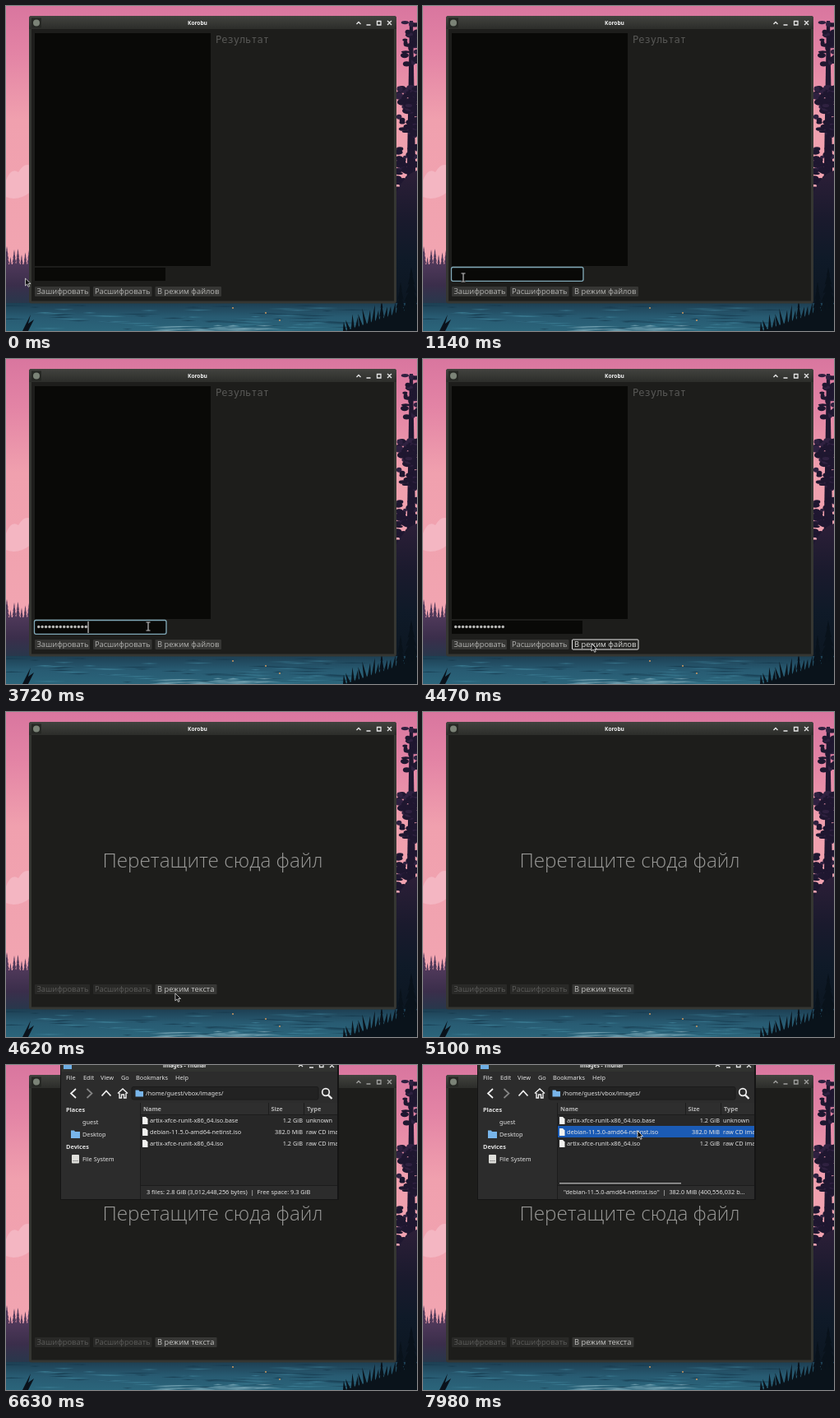
Recreate the animation shown at these times as an HTML page. Size 500 by 395 pixels, loop 8 s.

```html
<!DOCTYPE html>
<html lang="ru">
<head>
<meta charset="utf-8">
<title>Korobu</title>
<style>
html, body { margin: 0; width: 100%; height: 100%; overflow: hidden; background: #1d1d1b }
svg { display: block; width: 500px; height: 395px }
text { white-space: pre }
.ui { font: 9.3px "Open Sans", "Noto Sans", sans-serif; fill: #b4b4b2 }
.fm { font: 7.35px "Noto Sans", sans-serif; fill: #e2e2e2 }
.bold { font-weight: 700 }
.title { font: 700 6.6px "Noto Sans", sans-serif; fill: #f0f0f0; text-anchor: middle }
.line { fill: none; stroke: #e6e6e6; stroke-width: 1.3 }
</style>
</head>
<body>
<svg viewBox="0 0 500 395">
  <defs>
    <linearGradient id="sky" x2="0" y2="1">
      <stop offset="0" stop-color="#d9769f"/>
      <stop offset=".15" stop-color="#e384a5"/>
      <stop offset=".35" stop-color="#f0a0ae"/>
      <stop offset="1" stop-color="#f2a7b2"/>
    </linearGradient>
    <linearGradient id="wood" x2="0" y2="1">
      <stop offset="0" stop-color="#4e3859"/>
      <stop offset=".5" stop-color="#3b2e4b"/>
      <stop offset="1" stop-color="#26394c"/>
    </linearGradient>
    <linearGradient id="hill" x2="0" y2="1">
      <stop offset="0" stop-color="#2c1f38"/>
      <stop offset=".3" stop-color="#1a1a2d"/>
      <stop offset=".55" stop-color="#0f1a28"/>
      <stop offset="1" stop-color="#0a141d"/>
    </linearGradient>
    <linearGradient id="lake" x2="0" y2="1">
      <stop offset="0" stop-color="#1d3f53"/>
      <stop offset=".5" stop-color="#285b72"/>
      <stop offset="1" stop-color="#2b657b"/>
    </linearGradient>
    <linearGradient id="bar" x2="0" y2="1">
      <stop offset="0" stop-color="#42433f"/>
      <stop offset="1" stop-color="#2c2d2a"/>
    </linearGradient>
    <clipPath id="fmClip"><path d="M67 0H403V163H67z"/></clipPath>
  </defs>

  <rect width="500" height="395" fill="url(#sky)"/>
  <path d="M0 212Q6 196 15 202Q22 190 30 194V226Q14 238 0 232z" fill="#f4b6c2"/>
  <g id="scene"></g>

  <rect x="28" y="12" width="447" height="349.5" rx="3" fill="#353632"/>
  <path d="M28 28V15a3 3 0 0 1 3-3H472a3 3 0 0 1 3 3V28z" fill="url(#bar)"/>
  <rect x="31" y="28" width="441" height="330.5" fill="#1d1d1b"/>
  <rect x="31" y="14.500" width="12" height="12" fill="#262824"/>
  <circle cx="37" cy="20.500" r="4" fill="#7b8377"/>
  <g id="frameTitle">
    <text class="title" x="233" y="23">Korobu</text>
    <path class="line" d="M426.500 22l2.500-2.500 2.500 2.500M438.500 23h5M451.500 18.500h4.500v4.500h-4.500zM464 18l5 5M469 18l-5 5"/>
  </g>

  <g id="textMode" class="ui">
    <rect x="35" y="33" width="214" height="283" fill="#090907"/>
    <text x="255" y="45" style="font:12px 'DejaVu Sans Mono',monospace" fill="#585856">Результат</text>
    <rect x="35" y="318" width="159" height="16" fill="#090907"/>
    <rect id="fieldRing" x="34.500" y="317.500" width="160.500" height="16.800" rx="2" fill="none" stroke="#80a9b8" stroke-width="1.300"/>
    <g id="dots" fill="#b8b8b6"></g>
    <rect id="caret" y="319" width="1" height="14" fill="#f2f2f2"/>
    <g fill="#363634">
      <rect x="35" y="341" width="67" height="12" rx="1"/>
      <rect x="106" y="341" width="71.500" height="12" rx="1"/>
      <rect id="modeBox" x="181.500" y="341" width="80.500" height="12" rx="1"/>
    </g>
    <text x="37.400" y="350.200">Зашифровать</text>
    <text x="107.900" y="350.200">Расшифровать</text>
    <text id="modeText" x="184" y="350.200">В режим файлов</text>
  </g>

  <g id="fileMode" class="ui">
    <text x="251.500" y="189" text-anchor="middle" style="font-size:24.3px;font-weight:300" fill="#999997">Перетащите сюда файл</text>
    <g fill="#292927">
      <rect x="35" y="331" width="67" height="12" rx="1"/>
      <rect x="106" y="331" width="71.500" height="12" rx="1"/>
      <rect x="181.500" y="331" width="75" height="12" rx="1" fill="#373735"/>
    </g>
    <text x="37.400" y="340.200" fill="#5c5c5a">Зашифровать</text>
    <text x="107.900" y="340.200" fill="#5c5c5a">Расшифровать</text>
    <text x="184" y="340.200" fill="#c4c4c2">В режим текста</text>
  </g>

  <g id="files" class="fm">
    <rect x="66" width="339" height="164" fill="#151515"/>
    <g clip-path="url(#fmClip)">
      <rect x="67" width="337" height="163" fill="#2c2c2c"/>
      <rect x="67" width="337" height="8" fill="#313230"/>
      <text class="title" x="217.500" y="3">images - Thunar</text>
      <path class="line" d="M356 2l2.500-2.500 2.500 2.500M369 3h5M381.500-2h4.500v4.500h-4.500zM394-2l5 5M399-2l-5 5"/>
      <rect x="70" y="-4" width="10" height="9" fill="#6faee4"/>
      <g id="menu"></g>
      <g fill="none" stroke="#f0f0f0" stroke-width="1.700">
        <path d="M85 29l-6 5.500 6 5.500"/>
        <path d="M98.500 29l6 5.500-6 5.500" stroke="#858585"/>
        <path d="M116.500 37.500l5.500-6 5.500 6"/>
        <path d="M136 34.500l6-5.500 6 5.500M138 34v6h2.500v-4h3v4h2.500v-6" stroke-width="1.400"/>
        <circle cx="389" cy="33" r="4.300"/>
        <path d="M392 36.500l4.500 4.500" stroke-width="2.300"/>
      </g>
      <rect x="153" y="26.500" width="227" height="15.500" rx="2" fill="#222" stroke="#1b1b1b"/>
      <path d="M157.500 30.500h4l1 1.500h4.500v6.500h-9.500z" fill="#78b5ea"/>
      <text x="170" y="37.300">/home/guest/vbox/images/</text>

      <rect x="164" y="46" width="240" height="100" fill="#272727"/>
      <rect x="164" y="46" width="240" height="14" fill="#2e2e2e"/>
      <path d="M163.500 46V163M319.500 46V60M362.500 46V60M164 60.500H404M164 146.500H404" stroke="#1c1c1c"/>
      <rect id="selected" x="164" y="74" width="240" height="14" fill="#1b5bb5"/>
      <g class="bold" fill="#b4b4b4">
        <text x="167" y="56">Name</text><text x="322.500" y="56">Size</text><text x="366" y="56">Type</text>
      </g>
      <g id="rows"></g>
      <g class="bold"><text x="73" y="57">Places</text><text x="73" y="102">Devices</text></g>
      <text x="93" y="72">guest</text>
      <text x="93" y="87">Desktop</text>
      <text x="93" y="117">File System</text>
      <path d="M79 79.500h4l1 1.500h6v8h-11z" fill="#78b5ea"/>
      <rect x="80" y="109" width="9" height="10.500" rx="1" fill="#dededa"/>
      <path d="M81 116.500h7" stroke="#999"/>
      <rect id="scroll" x="166" y="143" width="148" height="1.500" fill="#a2a2a2"/>
      <text id="status" x="171" y="157"></text>
    </g>
  </g>

  <path id="arrow" d="M0 0V9L2.100 7 3.700 10.300 5.200 9.600 3.700 6.500H6.600z" fill="#111" stroke="#e0e0e0" stroke-width=".8"/>
  <g id="beam" fill="none">
    <path d="M-2.500-5H2.500M0-5V5M-2.500 5H2.500" stroke="#111" stroke-width="2.600"/>
    <path d="M-2.500-5H2.500M0-5V5M-2.500 5H2.500" stroke="#bbb" stroke-width="1.200"/>
  </g>
</svg>
<script>
const $ = id => document.getElementById(id);
const show = (id, on) => $(id).style.display = on ? '' : 'none';

let seed = 7;
const rnd = (a, b) => {
  seed = seed * 16807 % 2147483647;
  return a + (b - a) * seed / 2147483647;
};
const path = (d, fill, more = '') => `<path d="${d}" fill="${fill}" ${more}/>`;

// A pine made of jagged tiers, tip at (x, y)
function pine(x, y, w, h, fill) {
  let right = '', left = '';
  const tiers = 6;
  for (let i = 1; i <= tiers; i++) {
    const half = w * i / tiers / 2, ty = y + h * i / tiers;
    right += `L${x + half} ${ty}L${x + half * .5} ${ty - 1}`;
    left = `L${x - half * .5} ${ty - 1}L${x - half} ${ty}` + left;
  }
  return path(`M${x} ${y}${right}${left}z`, fill);
}

function leaves(count, left, top, bottom) {
  let s = '';
  for (let i = 0; i < count; i++) {
    const fill = i % 4 ? '#1f1730' : '#2f2140';
    s += `<ellipse cx="${rnd(left, 502)}" cy="${rnd(top, bottom)}" rx="${rnd(2.5, 6)}" ry="${rnd(1.5, 4)}" fill="${fill}"/>`;
  }
  return s;
}

function streaks(count, x0, x1, y0, y1, fill, opacity) {
  let d = '';
  for (let i = 0; i < count; i++) {
    const w = rnd(12, 60);
    d += `M${rnd(x0, x1) - w / 2} ${rnd(y0, y1)}l${w / 2} -.6 ${w / 2} .6 ${-w / 2} .6z`;
  }
  return path(d, fill, `opacity="${opacity}"`);
}

function grass(from, to, height, fill) {
  let d = `M${from} 396`;
  for (let x = from; x < to; x += 5) {
    const y = 395 - height(x);
    d += `L${x} ${y + 6}L${x + rnd(-2, 4)} ${y - rnd(4, 14)}L${x + 4} ${y + 6}`;
  }
  return path(d + `L${to} 396z`, fill);
}

function drawScene() {
  let s = '';
  for (let x = 1; x < 34; x += 4.5) s += pine(x, rnd(292, 306), 10, 32, '#4e3859');
  s += path('M0 314H34V364H0z', 'url(#wood)');

  s += path('M491 18H495L499 250H487z', '#1f1730');
  s += leaves(36, 484, 20, 72) + leaves(85, 477, 98, 158) + leaves(80, 475, 170, 240);
  s += path('M470 236Q484 204 500 200V395H470z', 'url(#hill)');

  s += path('M0 361H500V395H0z', 'url(#lake)');
  s += streaks(40, 0, 430, 363, 394, '#14374a', .7);
  s += streaks(30, 40, 400, 366, 395, '#4489a0', .6);
  s += streaks(22, 190, 320, 388, 395, '#86b3c0', .7);
  for (const [x, y] of [[276, 367], [316, 373], [333, 382]])
    s += `<circle cx="${x}" cy="${y}" r=".9" fill="#e0a060"/>`;
  s += path('M20 395L30 375 27 386 34 381 27 395z', '#0a121b');
  for (const [x, y, w] of [[493, 318, 26], [480, 336, 22], [457, 357, 17]])
    s += pine(x, y, w, 62, '#09121b');
  s += grass(410, 502, x => 6 + (x - 410) * .34, '#0a131b');
  $('scene').innerHTML = s;
}

function fillLists() {
  const menu = [['File', 73], ['Edit', 94], ['View', 115], ['Go', 140], ['Bookmarks', 158], ['Help', 206]];
  $('menu').innerHTML = menu.map(([word, x]) => `<text x="${x}" y="18">${word}</text>`).join('');
  const rows = [
    ['artix-xfce-runit-x86_64.iso.base', '1.2 GiB', 'unknown'],
    ['debian-11.5.0-amd64-netinst.iso', '382.0 MiB', 'raw CD image'],
    ['artix-xfce-runit-x86_64.iso', '1.2 GiB', 'raw CD image']
  ];
  $('rows').innerHTML = rows.map(([name, size, type], i) => {
    const y = 70 + 14 * i;
    return path(`M166 ${y - 7}h4l2.500 2.500v6.500h-6.500z`, '#f2f2f0') +
      `<text x="175" y="${y}">${name}</text>` +
      `<text x="361" y="${y}" text-anchor="end">${size}</text>` +
      `<text x="365" y="${y}">${type}</text>`;
  }).join('');
  $('dots').innerHTML = keyTimes.map((_, i) =>
    `<circle cx="${39.7 + 4.43 * i}" cy="325.500" r="1.700"/>`).join('');
}

const LOOP = 8000;
const CLICK_FIELD = 510, PRESS_MODE = 4380, SWITCH = 4560, OPEN = 5640, SELECT = 7890;
const keyTimes = [1320, 1395, 1470, 1620, 1680, 1830, 1920, 2070, 2170, 2280, 2430, 2580, 2760, 2880];
// time, x, y
const route = [
  [0, 23.5, 331], [240, 49, 330], [3510, 49, 330], [3720, 173, 325], [4290, 205, 346],
  [4590, 205, 346], [5090, 283, -20], [7060, 283, -20], [7860, 261, 80], [LOOP, 261, 80]
];

function pointer(t) {
  const i = route.findIndex(p => p[0] > t);
  const [t0, x0, y0] = route[i - 1], [t1, x1, y1] = route[i];
  const u = (t - t0) / (t1 - t0), e = u * u * (3 - 2 * u);
  return [x0 + (x1 - x0) * e, y0 + (y1 - y0) * e];
}

function draw(t) {
  const textMode = t < SWITCH, open = t >= OPEN, selected = t >= SELECT;
  const pressed = t >= PRESS_MODE, focused = t >= CLICK_FIELD && !pressed;
  const [x, y] = pointer(t);

  show('textMode', textMode);
  show('fileMode', !textMode);
  show('files', open);
  $('frameTitle').style.opacity = open ? .6 : 1;

  const typed = keyTimes.filter(k => k <= t).length;
  [...$('dots').children].forEach((dot, i) => dot.style.display = i < typed ? '' : 'none');
  show('fieldRing', focused);
  show('caret', focused && !(t >= 1140 && t < keyTimes[0]));
  $('caret').setAttribute('x', 37.5 + 4.43 * typed);

  const hover = x > 181 && y > 340 && y < 354;
  $('modeBox').setAttribute('fill', pressed ? '#252523' : hover ? '#444442' : '#363634');
  $('modeBox').setAttribute('stroke', pressed ? '#e8e8e8' : 'none');
  $('modeText').style.fill = hover ? '#dededc' : '';

  show('selected', selected);
  show('scroll', open && x > 164 && y > 46);
  $('status').textContent = selected
    ? '"debian-11.5.0-amd64-netinst.iso"  |  382.0 MiB (400,556,032 b…'
    : '3 files: 2.8 GiB (3,012,448,256 bytes)  |  Free space: 9.3 GiB';

  const overField = textMode && x > 35 && x < 195 && y > 317 && y < 335;
  show('beam', overField);
  show('arrow', !overField);
  $(overField ? 'beam' : 'arrow').setAttribute('transform', `translate(${x} ${y})`);
}

drawScene();
fillLists();
function tick() {
  draw(performance.now() % LOOP);
  requestAnimationFrame(tick);
}
tick();
</script>
</body>
</html>
```
